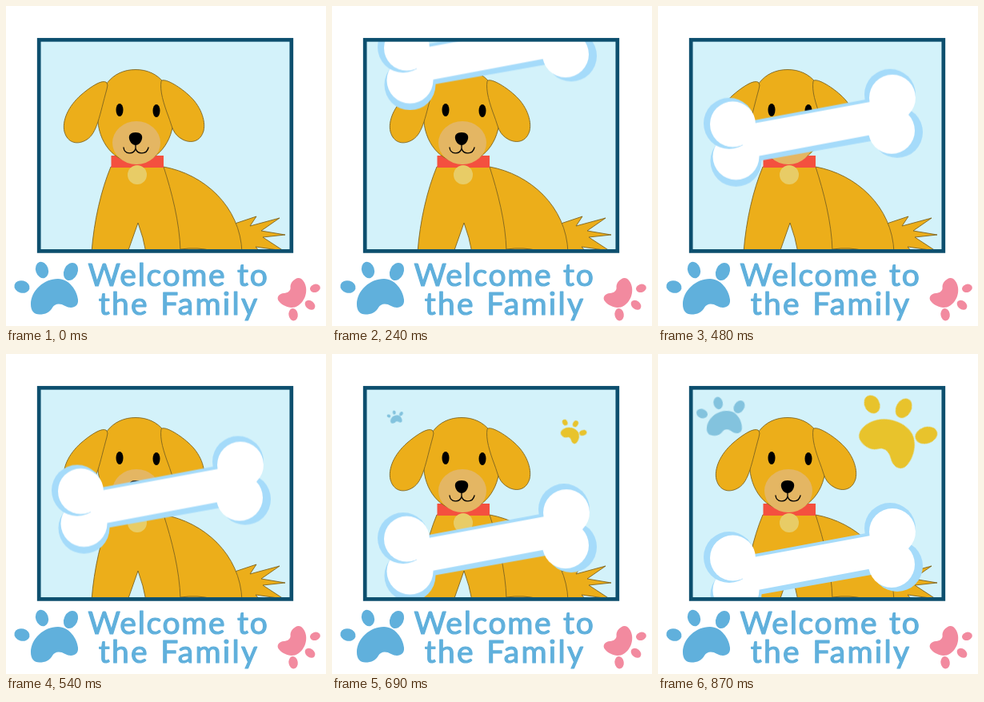
Animation, 400 px wide and 400 px high, one loop 900 ms. Source, as an HTML page:

```html
<!DOCTYPE html>
<html lang="en">
<head>
<meta charset="utf-8">
<title>Welcome to the Family</title>
<style>
  html, body { margin: 0; width: 100%; height: 100%; overflow: hidden; background: #fff; }
  svg { display: block; width: 100vw; height: 100vh; }
  .fur { fill: #ecae1a; stroke: #7d6420; stroke-width: .9; stroke-linejoin: round; }
  .line { fill: none; stroke: #7d6420; stroke-width: .9; }
  .mouth { fill: none; stroke: #000; stroke-width: 1.3; stroke-linecap: round; }
  .rim { fill: #a5dbfa; }
  .white { fill: #fff; }
  text {
    font: 400 39px Lato, "Open Sans", sans-serif;
    letter-spacing: 1.7px; word-spacing: 2px; text-anchor: middle;
    fill: #60b0dc; stroke: #60b0dc; stroke-width: 1.2; stroke-linejoin: round;
  }
  .wide { letter-spacing: 2.3px; }
</style>
</head>
<body>
<svg viewBox="0 0 400 400">
  <defs>
    <clipPath id="view"><rect x="43" y="44" width="312" height="260"/></clipPath>
    <g id="paw">
      <ellipse cx="-41" cy="-12" rx="9.7" ry="7.7" transform="rotate(15 -41 -12)"/>
      <ellipse cx="-16" cy="-33" rx="7.8" ry="10.5" transform="rotate(-18 -16 -33)"/>
      <ellipse cx="20" cy="-31" rx="8.5" ry="11.5" transform="rotate(25 20 -31)"/>
      <path d="M-30 10C-30-7-14-22 4-22C18-22 28-7 29 4C30 14 20 16 13 12C6 8 0 9-3 14C-6 20-12 22.500-19 22.500C-26 22.500-30 18-30 10Z"/>
    </g>
  </defs>

  <rect x="41" y="42" width="316" height="264" fill="#d3f2fa"/>

  <g clip-path="url(#view)">
    <g id="gold" fill="#e8c32c">
      <use href="#paw" transform="translate(291 109.500) rotate(47) scale(1.22)"/>
    </g>
    <g id="sky" fill="#83c3de">
      <use href="#paw" transform="translate(84 87) rotate(7) scale(.74)"/>
    </g>

    <!-- dog -->
    <path class="fur" d="M286 272L313 263L305 275L342 265L319 281L349 286L321 289L347 306L312 301L318 308H290Z"/>
    <path class="fur" d="M131 201H197C247 210 293 250 295 308H175Q172 290 165 271L152 308H107C110 268 119 230 131 201Z"/>
    <path class="line" d="M197 201C207 232 217 270 218 306M218 304Q240 301 258 306"/>
    <rect x="131.5" y="187" width="65.5" height="15" fill="#f4503f"/>
    <circle cx="164" cy="211" r="12" fill="#e8cc66"/>
    <path class="fur" d="M114.500 137C114.500 103 132 79.500 162 79.500C192 79.500 209.500 103 209.500 137C209.500 171 188 195.500 162 195.500C136 195.500 114.500 171 114.500 137Z"/>
    <path class="fur" d="M126 96C121 91 107 100 94 111C77 126 70 144 73 157C77 172 90 174 101 167C114 159 117 136 126 104Q128 98 126 96Z"/>
    <path class="fur" d="M194 94C197 89 216 100 228 111C243 124 250 143 247 156C243 170 231 172 221 167C208 160 208 151 203 138C197 122 192 106 194 94Z"/>
    <ellipse cx="163" cy="171" rx="30" ry="27" fill="#e4b663"/>
    <ellipse cx="142" cy="130" rx="4.500" ry="8"/>
    <ellipse cx="188" cy="131" rx="4.500" ry="8"/>
    <path d="M162 158C168 158 171 161 170 166C169 171 165 174 162 174C159 174 155 171 154 166C153 161 156 158 162 158Z"/>
    <path class="mouth" d="M162 173V178M147 177C148 186 160 186 162 178C164 186 176 186 178 177"/>

    <g id="bone">
      <path class="rim" d="M110 192L268 162.500L278 214L120 242Z"/>
      <circle class="rim" cx="97.500" cy="241" r="32"/>
      <circle class="white" cx="97.500" cy="235.500" r="29"/>
      <circle class="rim" cx="89" cy="194" r="32"/>
      <circle class="white" cx="93.500" cy="195" r="28.500"/>
      <circle class="rim" cx="299" cy="205" r="32"/>
      <circle class="rim" cx="290" cy="158" r="32"/>
      <circle class="white" cx="292" cy="203" r="29"/>
      <circle class="white" cx="293" cy="162" r="29"/>
      <path class="white" d="M106 196.500L290 162.500L292 203.500L106 238.500Z"/>
    </g>
  </g>

  <rect x="41.200" y="42.300" width="315.600" height="264.100" fill="none" stroke="#0d4f6e" stroke-width="4.700"/>

  <use href="#paw" fill="#60b0dc" transform="translate(61 363)"/>
  <use href="#paw" fill="#f28a9f" transform="translate(359 361) rotate(147) scale(.67)"/>
  <text x="215.500" y="350">Welcome to</text>
  <text class="wide" x="216" y="386">the Family</text>
</svg>

<script>
  const LOOP = 900, STEP = 30;

  // Runs a stepped move between two times of the loop and holds outside it.
  function move(id, start, end, from, to) {
    document.getElementById(id).animate([
      { transform: from, offset: 0 },
      { transform: from, offset: start / LOOP, easing: `steps(${(end - start) / STEP}, end)` },
      { transform: to, offset: end / LOOP },
      { transform: to, offset: 1 }
    ], { duration: LOOP, iterations: Infinity, delay: -1 }); // 1 ms lead keeps step edges clear of rounding
  }

  function grow(id, x, y) {
    document.getElementById(id).style.transformOrigin = `${x}px ${y}px`;
    move(id, 600, 870, 'scale(0)', 'scale(1)');
  }

  move('bone', 0, 750, 'translateY(-238px)', 'translateY(60px)');
  grow('gold', 303, 97);
  grow('sky', 79, 79);
</script>
</body>
</html>
```
